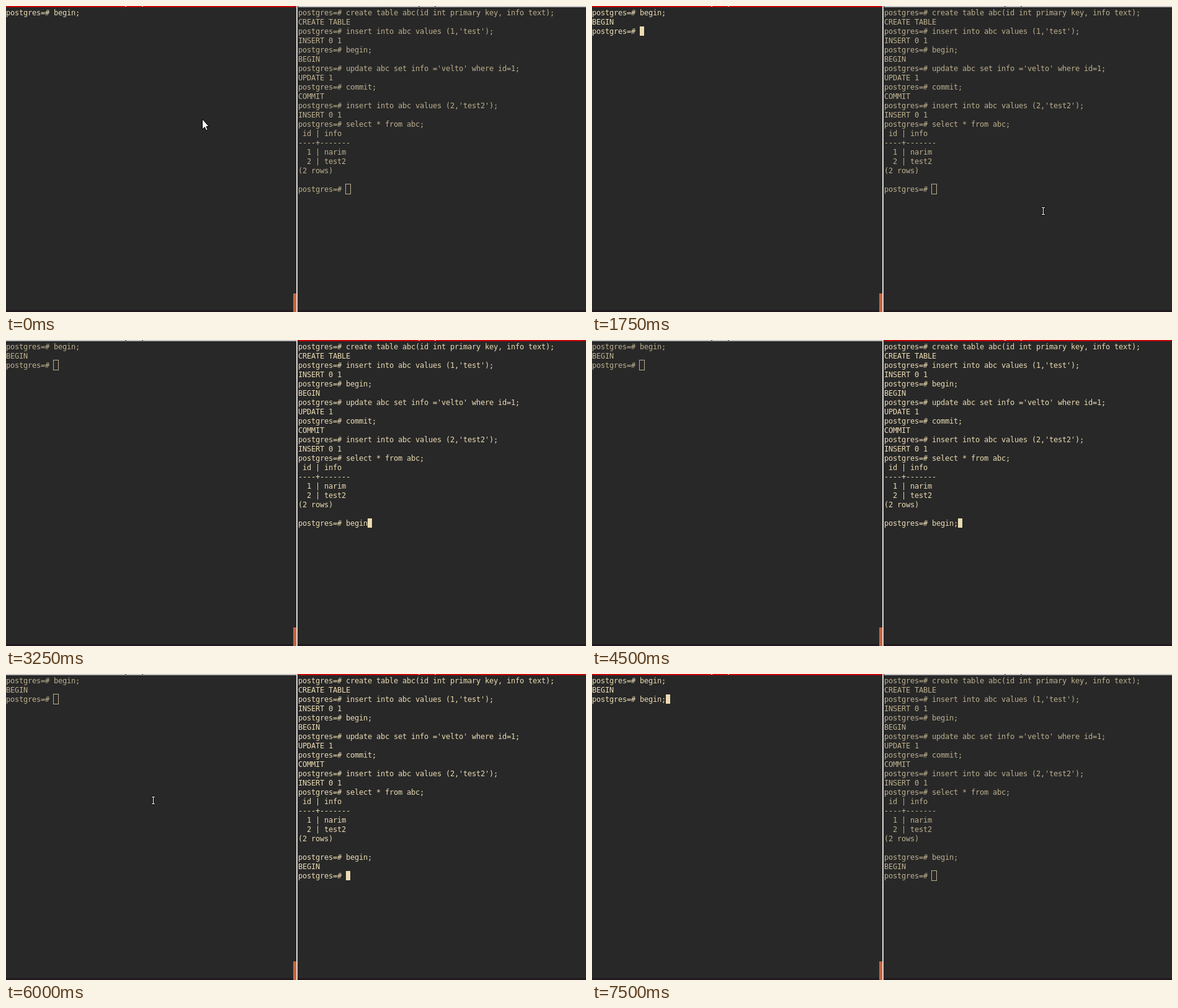
Animation of 935 by 494 pixels, one loop 8000 ms. Source, as an HTML page with a canvas:

```html
<!DOCTYPE html>
<html lang="en">
<head>
<meta charset="utf-8">
<title>Two psql sessions</title>
<style>
  html, body { margin: 0; width: 100%; height: 100%; overflow: hidden; background: #282828; }
  canvas { display: block; }
</style>
</head>
<body>
<canvas id="stage" width="935" height="494"></canvas>
<script>
const ctx = document.getElementById('stage').getContext('2d');
const LOOP = 8000, CELL_W = 7, CELL_H = 15, TOP = 3, BASELINE = 12;
const BRIGHT = '#ebdbb2', DIM = '#bcaf8e';
const PROMPT = 'postgres=# ';

const history = `${PROMPT}create table abc(id int primary key, info text);
CREATE TABLE
${PROMPT}insert into abc values (1,'test');
INSERT 0 1
${PROMPT}begin;
BEGIN
${PROMPT}update abc set info ='velto' where id=1;
UPDATE 1
${PROMPT}commit;
COMMIT
${PROMPT}insert into abc values (2,'test2');
INSERT 0 1
${PROMPT}select * from abc;
 id | info
----+-------
  1 | narim
  2 | test2
(2 rows)

`;
const begun = PROMPT + 'begin;\nBEGIN\n';

// Each step changes part of the state; text holds until replaced.
const steps = [
  [0, { focus: 'left', left: PROMPT + 'begin;', right: history + PROMPT, blink: false, mouse: [316, 182], arrow: true }],
  [500, { blink: true, mouse: null, arrow: false }],
  [1250, { blink: false }],
  [1500, { left: begun + PROMPT, blink: true, mouse: [316, 177] }],
  [1750, { mouse: [724, 323] }],
  [2000, { focus: 'right', mouse: [750, 333] }],
  [2750, { mouse: null }],
  [3000, { right: history + PROMPT + 'be' }],
  [3250, { right: history + PROMPT + 'begin' }],
  [4000, { blink: false }],
  [4500, { right: history + PROMPT + 'begin;', blink: true }],
  [5000, { right: history + begun + PROMPT }],
  [5250, { blink: false }],
  [5500, { mouse: [750, 333] }],
  [5750, { mouse: [457, 203], blink: true }],
  [6000, { mouse: [234, 196] }],
  [6250, { focus: 'left' }],
  [7000, { blink: false }],
  [7250, { blink: true, mouse: null }],
  [7500, { left: begun + PROMPT + 'begin;' }]
];

function stateAt(time) {
  return Object.assign({}, ...steps.filter(([start]) => start <= time).map(([, change]) => change));
}

function rect(color, x, y, w, h) {
  ctx.fillStyle = color;
  ctx.fillRect(x, y, w, h);
}

function drawPane(x, width, text, active, blink, marks) {
  rect(active ? '#c80003' : '#c0bebf', x, 0, width, 2);
  for (const mark of marks) rect(active ? '#fff' : '#222', mark, 0, 2, 1);

  const color = active ? BRIGHT : DIM;
  const lines = text.split('\n');
  ctx.fillStyle = color;
  lines.forEach((line, row) => {
    [...line].forEach((char, col) =>
      ctx.fillText(char, x + col * CELL_W, TOP + row * CELL_H + BASELINE));
  });

  const row = lines.length - 1;
  const cx = x + lines[row].length * CELL_W, cy = TOP + row * CELL_H;
  if (!active) {
    ctx.strokeStyle = color;
    ctx.lineWidth = 1;
    ctx.strokeRect(cx - 0.5, cy - 0.5, CELL_W + 1, CELL_H + 1);
  } else if (blink) {
    rect(color, cx, cy, CELL_W, CELL_H);
  }
}

function drawArrow(x, y) {
  const path = new Path2D('M.5 .5V17L4.3 13.5 6.7 19 9.2 18 6.8 12.5H11.2Z');
  ctx.save();
  ctx.translate(x, y);
  ctx.fillStyle = '#fff';
  ctx.strokeStyle = '#000';
  ctx.lineWidth = 1;
  ctx.fill(path);
  ctx.stroke(path);
  ctx.restore();
}

function drawBeam(x, y) {
  const bars = [[1, 2, 5, 1], [3, 2, 1, 12], [1, 13, 5, 1]];
  for (const [bx, by, w, h] of bars) rect('#111', x + bx - 1, y + by - 1, w + 2, h + 2);
  for (const [bx, by, w, h] of bars) rect('#fff', x + bx, y + by, w, h);
}

function draw(now) {
  const state = stateAt(now % LOOP);
  const leftActive = state.focus === 'left';
  ctx.font = '12px "DejaVu Sans Mono", monospace';
  rect('#282828', 0, 0, 935, 494);
  rect('#211a1f', 0, 491, 935, 3);
  drawPane(0, 468, state.left, leftActive, state.blink, [192, 219]);
  drawPane(471, 464, state.right, !leftActive, state.blink, [665, 691]);
  rect('#c8623c', 463, 464, 5, 30);
  rect('#dcdad9', 468, 0, 2, 494);
  if (state.mouse) (state.arrow ? drawArrow : drawBeam)(...state.mouse);
}

const start = performance.now();
function tick() {
  draw(performance.now() - start);
  requestAnimationFrame(tick);
}
tick();
</script>
</body>
</html>
```
